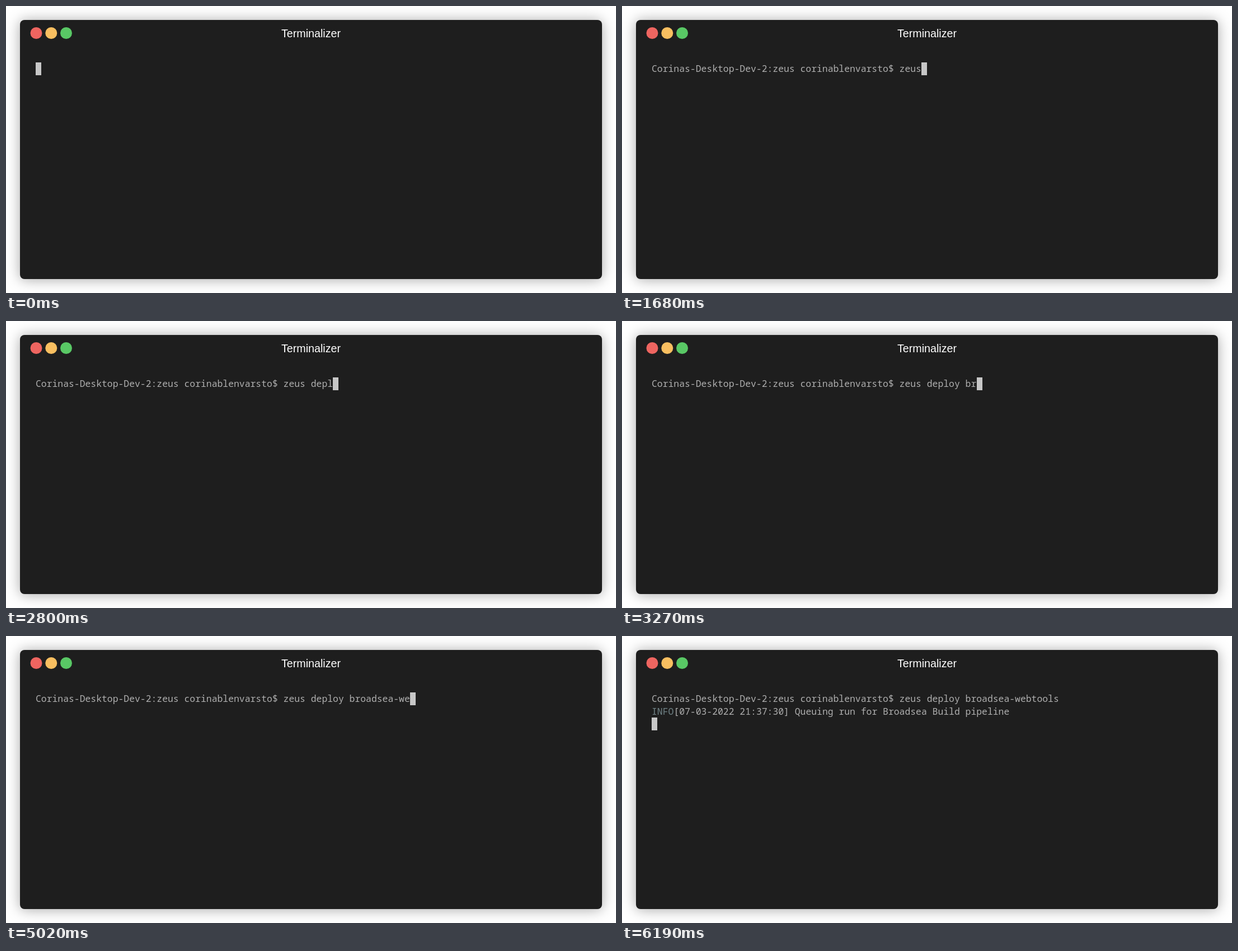
Recreate the animation shown at these times as an HTML page with a canvas. Size 1090 by 514 pixels, loop 8 s.

```html
<!DOCTYPE html>
<html lang="en">
<head>
<meta charset="utf-8">
<title>Terminal</title>
<style>
  html, body { margin: 0; width: 100%; height: 100%; overflow: hidden; background: #fff; }
  canvas { display: block; }
</style>
</head>
<body>
<canvas id="stage" width="1090" height="514"></canvas>
<script>
const ctx = document.getElementById('stage').getContext('2d');

const LOOP = 8000;
const CELL = 9.84, ROW = 22.6, LEFT = 53, TOP = 101;
const TEXT = '#afafaf', CYAN = '#708387', CURSOR = '#c7c7c7';

const PROMPT = 'Corinas-Desktop-Dev-2:zeus corinablenvarsto$ ';
const COMMAND = 'zeus deploy broadsea-webtools';
const LEVEL = 'INFO';
const MESSAGE = '[07-03-2022 21:37:30] Queuing run for Broadsea Build pipeline';

// One time per typed character of COMMAND; the prompt arrives with the first.
const KEYS = [
  1140, 1400, 1550, 1680, 1980,
  2490, 2590, 2700, 2800, 2890, 2985, 3080,
  3175, 3270, 3410, 3490, 3570, 3800, 3990, 4230, 4590,
  4800, 5020, 5240, 5460, 5620, 5770, 5940, 6020
];
const ENTER = 6105, OUTPUT = 6190;

function disc(x, color) {
  ctx.fillStyle = color;
  ctx.beginPath();
  ctx.arc(x, 48.5, 10.5, 0, Math.PI * 2);
  ctx.fill();
}

function drawWindow() {
  ctx.fillStyle = '#fff';
  ctx.fillRect(0, 0, 1090, 514);

  ctx.save();
  ctx.shadowColor = 'rgba(0, 0, 0, 0.35)';
  ctx.shadowBlur = 25;
  ctx.shadowOffsetY = 1;
  ctx.fillStyle = '#1e1e1e';
  ctx.beginPath();
  ctx.roundRect(25, 25, 1040, 464, 8);
  ctx.fill();
  ctx.restore();

  disc(54, '#ee6560');
  disc(80.8, '#f9bf60');
  disc(107.5, '#59c865');

  ctx.font = '19.7px "Liberation Sans", Arial, sans-serif';
  ctx.textAlign = 'center';
  ctx.fillStyle = '#fff';
  ctx.fillText('Terminalizer', 545, 56);
}

function print(text, col, row, color) {
  ctx.font = '16.4px "Noto Sans Mono", monospace';
  ctx.textAlign = 'left';
  ctx.fillStyle = color;
  ctx.fillText(text, LEFT + col * CELL, TOP + row * ROW + 17);
}

function drawCursor(col, row) {
  ctx.fillStyle = CURSOR;
  ctx.fillRect(Math.round(LEFT + col * CELL), Math.round(TOP + row * ROW), 10, 23);
}

function draw(t) {
  drawWindow();
  const typed = KEYS.filter(key => key <= t).length;
  const line = typed ? PROMPT + COMMAND.slice(0, typed) : '';
  print(line, 0, 0, TEXT);

  if (t >= OUTPUT) {
    print(LEVEL, 0, 1, CYAN);
    print(MESSAGE, LEVEL.length, 1, TEXT);
    drawCursor(0, 2);
  } else if (t >= ENTER) {
    drawCursor(0, 1);
  } else {
    drawCursor(line.length, 0);
  }
}

function tick() {
  draw(performance.now() % LOOP);
  requestAnimationFrame(tick);
}
tick();
</script>
</body>
</html>
```
